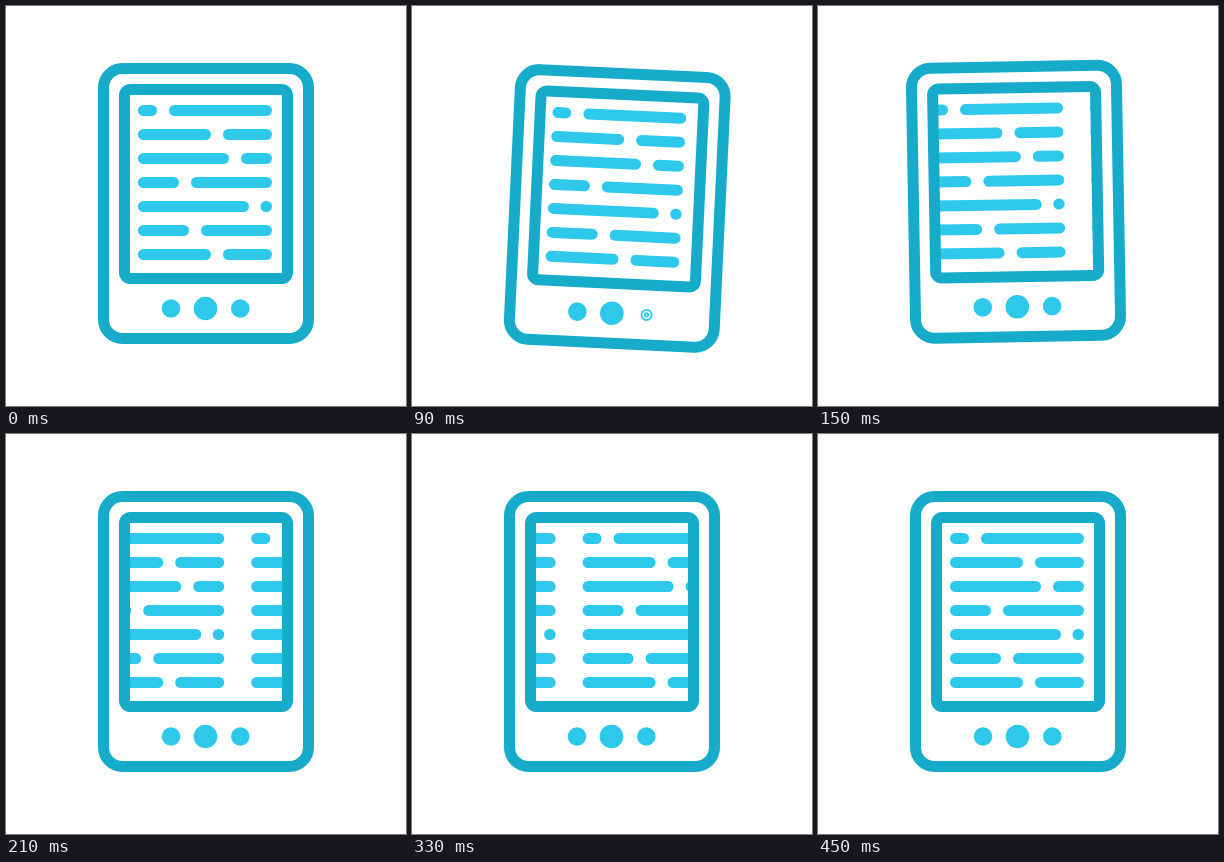
An HTML page that plays this animation: 400x400 px, repeating every 0.51 s.

```html
<!DOCTYPE html>
<html lang="en">
<head>
<meta charset="utf-8">
<title>E-reader page turn</title>
<style>
  html, body { margin: 0; width: 100%; height: 100%; overflow: hidden; background: #fff; }
  svg { display: block; width: 100%; height: 100%; }
  .frame { fill: none; stroke: #17abca; stroke-width: 11; }
  .ink { fill: #2ec8ea; }
</style>
</head>
<body>
<svg viewBox="0 0 400 400">
  <defs>
    <clipPath id="screen"><rect x="123.5" y="88.5" width="153" height="179"/></clipPath>
    <g id="page" class="ink"></g>
  </defs>
  <g id="device">
    <g clip-path="url(#screen)">
      <g id="pages">
        <use href="#page"/>
        <use href="#page" x="161"/>
      </g>
    </g>
    <rect class="frame" x="97.5" y="62.5" width="205" height="270" rx="19"/>
    <rect class="frame" x="118.5" y="83.5" width="163" height="189" rx="6"/>
    <g class="ink">
      <circle cx="165" cy="302.5" r="9.3"/>
      <circle cx="199.5" cy="302.5" r="11.8"/>
      <circle id="button" cx="234.3" cy="302.5" r="9.3"/>
    </g>
    <g id="ring" visibility="hidden">
      <circle cx="234.3" cy="302.5" r="3.4" fill="none" stroke="#fff" stroke-width="1.6"/>
      <circle cx="234.3" cy="302.5" r="0.8" fill="#fff"/>
    </g>
  </g>
</svg>
<script>
  const LOOP = 510, STEP = 30, PAGE = 161;
  const LEFT = 132, RIGHT = 266, LINE = 11;
  const TURN_START = 67, TURN_TIME = 390;

  // Each line of text is two bars; a pair gives the gap between them.
  const gaps = [[151, 163], [205, 217], [223, 235], [173, 185], [243, 254.5], [183, 195], [205, 217]];

  // One value per step, at rest afterwards.
  const tilt = [0, 0.7, 2, 2.7, 0.7, -1, -0.5];
  const radius = [9.3, 8.6, 7.2, 6, 7.8];

  const $ = id => document.getElementById(id);
  const device = $('device'), pages = $('pages'), button = $('button'), ring = $('ring');

  function addBar(x1, x2, y) {
    const bar = document.createElementNS('http://www.w3.org/2000/svg', 'rect');
    const box = { x: x1, y, width: x2 - x1, height: LINE, rx: LINE / 2 };
    for (const key in box) bar.setAttribute(key, box[key]);
    $('page').append(bar);
  }

  gaps.forEach(([end, start], i) => {
    const y = 99 + i * 24;
    addBar(LEFT, end, y);
    addBar(start, RIGHT, y);
  });

  function draw(time) {
    const step = Math.min(Math.floor(time % LOOP / STEP), 15);
    const u = Math.min(Math.max((step * STEP - TURN_START) / TURN_TIME, 0), 1);
    const shift = step === 15 ? PAGE : PAGE * (1 - Math.cos(Math.PI * u)) / 2;
    const r = radius[step] ?? radius[0];

    device.setAttribute('transform', `rotate(${tilt[step] ?? 0} 98 312)`);
    pages.setAttribute('transform', `translate(${-shift} 0)`);
    button.setAttribute('r', r);
    ring.setAttribute('visibility', r < 6.5 ? 'visible' : 'hidden');
  }

  const began = performance.now();
  function tick() {
    draw(performance.now() - began);
    requestAnimationFrame(tick);
  }
  tick();
</script>
</body>
</html>
```
